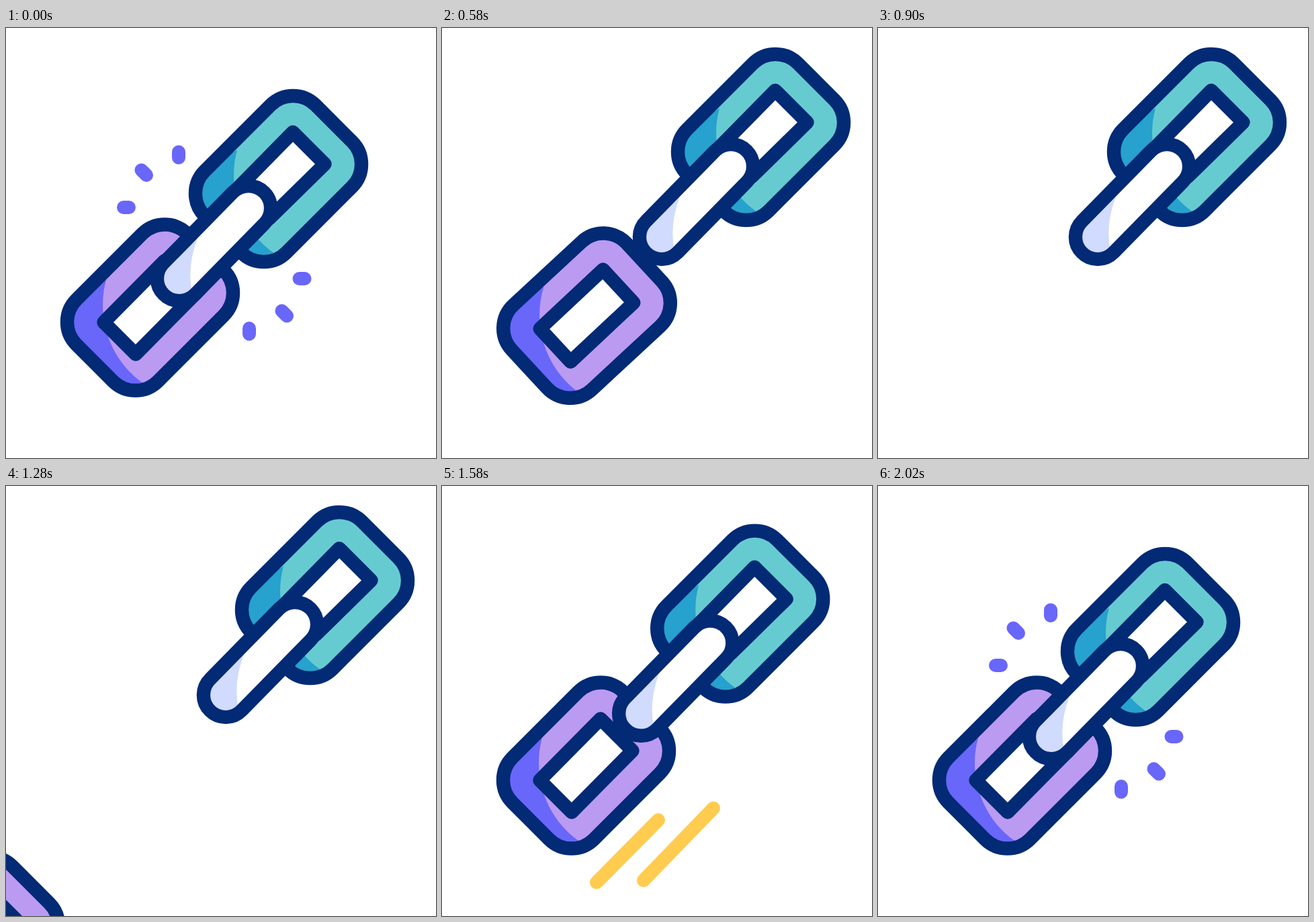
Recreate the animation shown at these times as an HTML page. Size 640 by 640 pixels, loop 2.32 s.

```html
<!DOCTYPE html>
<html lang="en">
<head>
<meta charset="utf-8">
<title>Chain link</title>
<style>
  html, body { margin: 0; width: 100%; height: 100%; overflow: hidden; background: #fff; }
  svg { display: block; width: 100%; height: 100%; }
  .ink { stroke: #022a75; stroke-width: 20.4; stroke-linecap: round; stroke-linejoin: round; }
  .tick { stroke: #6966fa; stroke-width: 20; stroke-linecap: round; }
  .streak { stroke: #ffcc50; stroke-width: 20; stroke-linecap: round; }
</style>
</head>
<body>
<svg viewBox="0 0 640 640">
  <defs>
    <rect id="body" x="97.9" y="330.2" width="233.2" height="171.6" rx="47.3" transform="rotate(-45 214.5 416)"/>
    <path id="shade" d="M149 375C135 425 150 490 203 528L160 570 40 440Z"/>
    <path id="rod" d="M234.6 349.6L337.6 244.6A33 33 0 0 1 384.4 291.4L281.4 396.4A33 33 0 0 1 234.6 349.6Z"/>
    <clipPath id="inBody"><use href="#body"/></clipPath>
    <clipPath id="inRod"><use href="#rod"/></clipPath>
  </defs>

  <g id="marks"></g>

  <g id="lower">
    <use href="#body" fill="#bb9af2"/>
    <g clip-path="url(#inBody)"><use href="#shade" fill="#6966fa"/></g>
    <use href="#body" fill="none" class="ink"/>
    <path class="ink" fill="#fff" d="M236 346.5L283.5 394 193 485.5 145.5 438Z"/>
  </g>

  <g id="upper">
    <g transform="translate(191 -191.5)">
      <use href="#body" fill="#66cbd1"/>
      <g clip-path="url(#inBody)"><use href="#shade" x="4" y="-2" fill="#27a1cd"/></g>
      <use href="#body" fill="none" class="ink"/>
      <path class="ink" fill="#fff" d="M147 437L236 346.5 283.5 394 201 475"/>
    </g>
    <use href="#rod" fill="#fff"/>
    <g clip-path="url(#inRod)"><path fill="#d1dbfd" d="M285 313Q269 355 277 394L260 420 200 380Z"/></g>
    <use href="#rod" fill="none" class="ink"/>
  </g>
</svg>
<script>
const LOOP = 2320;
const $ = id => document.getElementById(id);
const ramp = (t, a, b) => Math.min(1, Math.max(0, (t - a) / (b - a)));
const sine = p => (1 - Math.cos(Math.PI * p)) / 2;

// Each mark runs from its first point to its second.
function makeMark(kind, pts) {
  const el = document.createElementNS('http://www.w3.org/2000/svg', 'line');
  el.setAttribute('class', kind);
  $('marks').append(el);
  return { el, pts };
}

function trim({ el, pts: [x1, y1, x2, y2] }, from, to) {
  const at = (a, b, p) => a + (b - a) * p;
  el.setAttribute('x1', at(x1, x2, from));
  el.setAttribute('y1', at(y1, y2, from));
  el.setAttribute('x2', at(x1, x2, to));
  el.setAttribute('y2', at(y1, y2, to));
  el.style.display = to - from > 0.001 ? '' : 'none';
}

const ticks = [
  [257, 193, 257, 184.5], [209, 219, 201.5, 211.5], [183, 267, 175, 267],
  [436.5, 373, 444.5, 373], [410.5, 421, 418, 428.5], [362, 447, 362, 455.5]
].map(p => makeMark('tick', p));

const streaks = [
  { mark: makeMark('streak', [230, 590, 322, 497]), start: 1407 },
  { mark: makeMark('streak', [300, 587, 404, 479.5]), start: 1395 }
];

function moveLower(t) {
  let x = 0, y = 0, turn = 0;
  if (t < 900) {
    const fall = Math.pow(Math.max(0, t - 440) / 280, 2.8);
    x = 7 * fall;
    y = 83 * fall;
    turn = 15 * fall;
  } else {
    y = 348 * (1 - ramp(t, 1220, 1461));
    x = -y;
  }
  $('lower').setAttribute('transform', `translate(${x} ${y}) rotate(${turn} 214.5 416)`);
  $('lower').style.display = t >= 900 && t < 1230 ? 'none' : '';
}

function draw(t) {
  moveLower(t);

  const apart = ramp(t, 240, 390) - sine(ramp(t, 1460, 1720));
  $('upper').setAttribute('transform', `translate(${69 * apart} ${-62 * apart})`);

  for (const tick of ticks) {
    if (t < 1000) trim(tick, ramp(t, 240, 495), 1);
    else trim(tick, 0, ramp(t, 1780, 2020));
  }
  for (const { mark, start } of streaks) {
    trim(mark, ramp(t, 1590, 1775), ramp(t, start, 1464));
  }
}

const began = performance.now();
function frame() {
  draw((performance.now() - began) % LOOP);
  requestAnimationFrame(frame);
}
draw(0);
requestAnimationFrame(frame);
</script>
</body>
</html>
```
